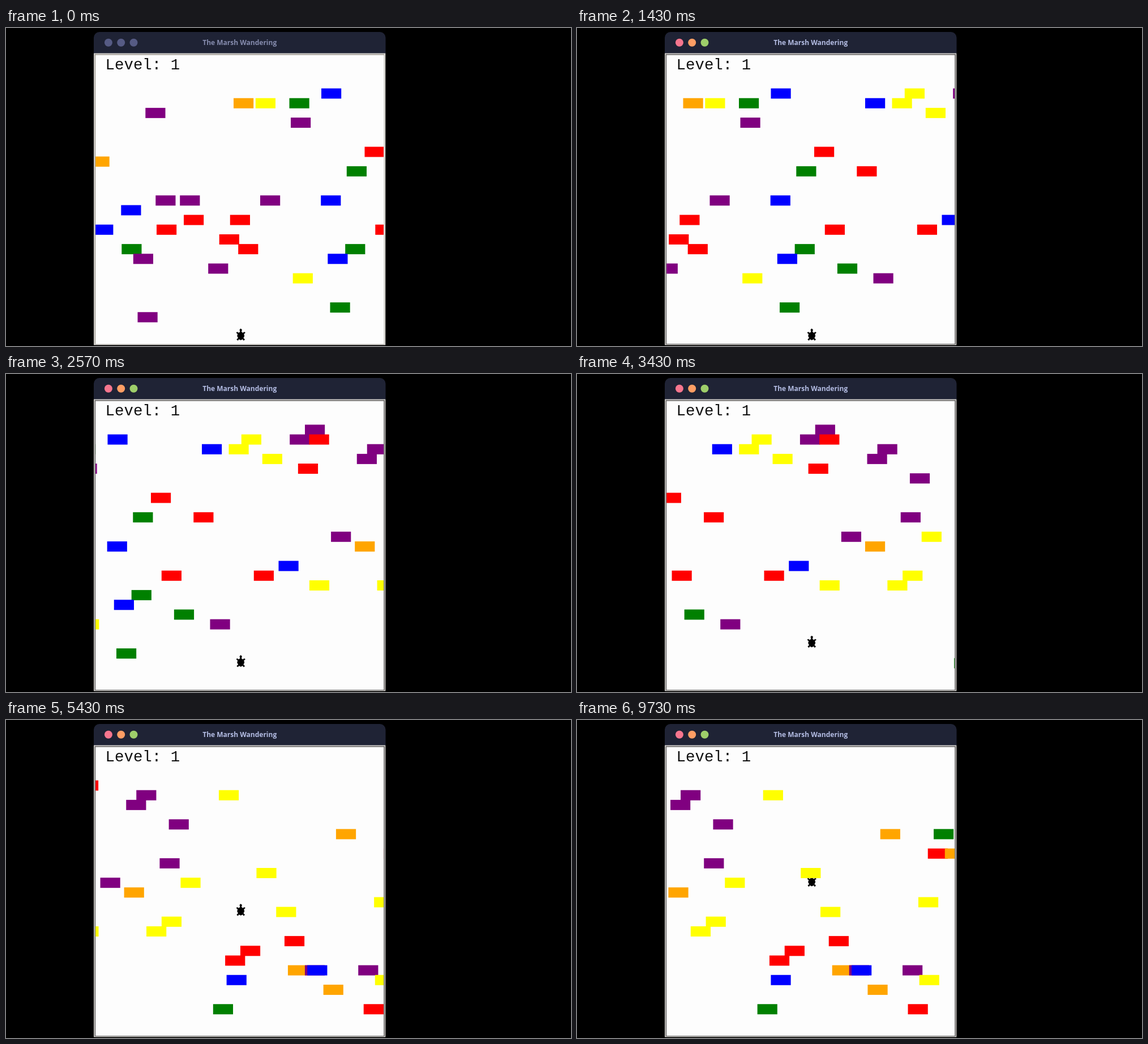
Animation of 998 by 561 pixels, one loop 9.79 s. Source, as an HTML page with a canvas:

```html
<!DOCTYPE html>
<html lang="en">
<head>
<meta charset="utf-8">
<title>The Marsh Wandering</title>
<style>
  html, body { margin: 0; width: 100%; height: 100%; overflow: hidden; background: #000; }
  canvas, svg { position: absolute; left: 0; top: 0; display: block; }
  #title { font: 700 12px "Open Sans", "Noto Sans", sans-serif; }
  #level { font: 27.4px "Liberation Mono", "Courier New", monospace; fill: #111; }
</style>
</head>
<body>
<canvas id="stage" width="998" height="561"></canvas>
<svg width="998" height="561" viewBox="0 0 998 561">
  <text id="title" x="412.7" y="30" text-anchor="middle">The Marsh Wandering</text>
  <text id="level" x="175.6" y="73">Level: 1</text>
</svg>
<script>
const ctx = document.getElementById('stage').getContext('2d');
const title = document.getElementById('title');

const LOOP = 9790, TICK = 100 / 3, FOCUS = 300;
const UNIT = 0.858, STEP = 5 * UNIT, ROW = 20 * UNIT;
const COLORS = { r: '#f00', o: '#ffa500', y: '#ff0', g: '#008000', b: '#00f', p: '#800080' };

// One string per lane, top to bottom: colour letter and left edge at the start.
const LANES = [
  'p905.5',
  'b557 y793.3 p878.7 r913',
  'o402 y440.8 g500.5 b723.5 y771 p1015.3 y1161',
  'p246.3 y830.3 p997.3',
  'p503 r893.4',
  'p1072.7',
  'o1368 g1462.3',
  'r633.5',
  'o147.5 r1452 o1482',
  'g601.8 r708.8 p1056.5',
  'y1227.5',
  'p951.6 y1093.5',
  'p264.3 p307.2 p449 b556.2 o993.7',
  'b203.3 y1435.2',
  'r314 r395.8 b859 y1262.3',
  'b154.2 r266 r652.3 r815.3 y1059.9',
  'r376.7 y913.4 y1033.1',
  'g204.3 r410.2 g599.2 r1277',
  'p224.8 b568.3 r1199',
  'p357.2 g674.4 r1172.2',
  'y506.7 p738 o1283 p1313 b1317.3 p1407.3',
  'b1174.7 y1436.9',
  'o1345.7',
  'g572.5',
  'p232.5 g1150.9 r1416.8'
];
const cars = LANES.flatMap((lane, row) => lane.split(' ').map(s => ({
  color: COLORS[s[0]], x: +s.slice(1), y: 89.4 + row * ROW
})));

// Traffic pace: [tick, steps made]; the crash stops everything.
const PACE = [[0, 0], [43, 50], [77, 88], [133, 143], [163, 183], [171, 194]];
const HOPS = [1850, 2250, 2900, 3400, 3800, 4200, 4580, 4740, 4900, 5060, 5220, 5380,
  5500, 5600, 5700];

// Right half of the turtle from head to tail, mirrored for the left.
const HALF = [[0, 16], [2, 14], [1, 10], [4, 7], [7, 9], [9, 8], [6, 5], [7, 1],
  [5, -3], [8, -6], [6, -8], [4, -5], [0, -7]];
const SHELL = HALF.concat(HALF.slice(1, -1).reverse().map(([x, y]) => [-x, y]));

function stepsAt(tick) {
  for (let i = 1; i < PACE.length; i++) {
    const [a, n] = PACE[i - 1], [b, m] = PACE[i];
    if (tick < b) return Math.floor(n + (m - n) * (tick - a) / (b - a));
  }
  return PACE[PACE.length - 1][1];
}

function rect(color, x, y, w, h) {
  ctx.fillStyle = color;
  ctx.fillRect(x, y, w, h);
}

function drawWindow(focused) {
  rect('#000', 0, 0, 998, 561);
  ctx.fillStyle = '#1f2335';
  ctx.beginPath();
  ctx.roundRect(155, 7, 515.5, 38, [10, 10, 0, 0]);
  ctx.fill();

  const dots = focused ? ['#f7768e', '#ff9e64', '#9ece6a'] : Array(3).fill('#565b84');
  dots.forEach((color, i) => {
    ctx.fillStyle = color;
    ctx.beginPath();
    ctx.arc(180.9 + i * 22.3, 25.8, 7, 0, Math.PI * 2);
    ctx.fill();
  });
  title.setAttribute('fill', focused ? '#b4bde4' : '#868cae');

  rect('#d6d4d0', 155, 44.5, 515.3, 514.8);
  if (focused) {
    rect('#6c6a6a', 156.5, 46, 512.5, 512);
  } else {
    rect('#9a958c', 156.8, 46.2, 511, 1.6);
    rect('#9a958c', 156.8, 46.2, 1.6, 511);
  }
  rect('#fdfdfd', 158.2, 47.7, 509, 509.3);
}

function drawTurtle(hops) {
  const y = 544.3 - hops * ROW;
  ctx.beginPath();
  for (const [dx, dy] of SHELL) ctx.lineTo(414.7 + dx * UNIT, y - dy * UNIT);
  ctx.closePath();
  ctx.fillStyle = ctx.strokeStyle = '#000';
  ctx.lineWidth = 0.9;
  ctx.fill();
  ctx.stroke();
}

function drawCars(shift) {
  ctx.save();
  ctx.beginPath();
  ctx.rect(158.2, 47.7, 508.8, 509.3);
  ctx.clip();
  for (const car of cars) {
    const x = car.x - shift;
    if (x > 120 && x < 670) rect(car.color, x, car.y, 35.2, 18);
  }
  ctx.restore();
}

function draw(now) {
  const t = now % LOOP;
  const tick = Math.floor((t + 3.4) / TICK);
  drawWindow(t >= FOCUS);
  drawTurtle(HOPS.filter(h => h <= t).length);
  drawCars(stepsAt(tick) * STEP);
}

const start = performance.now();
function loop() {
  draw(performance.now() - start);
  requestAnimationFrame(loop);
}
loop();
</script>
</body>
</html>
```
